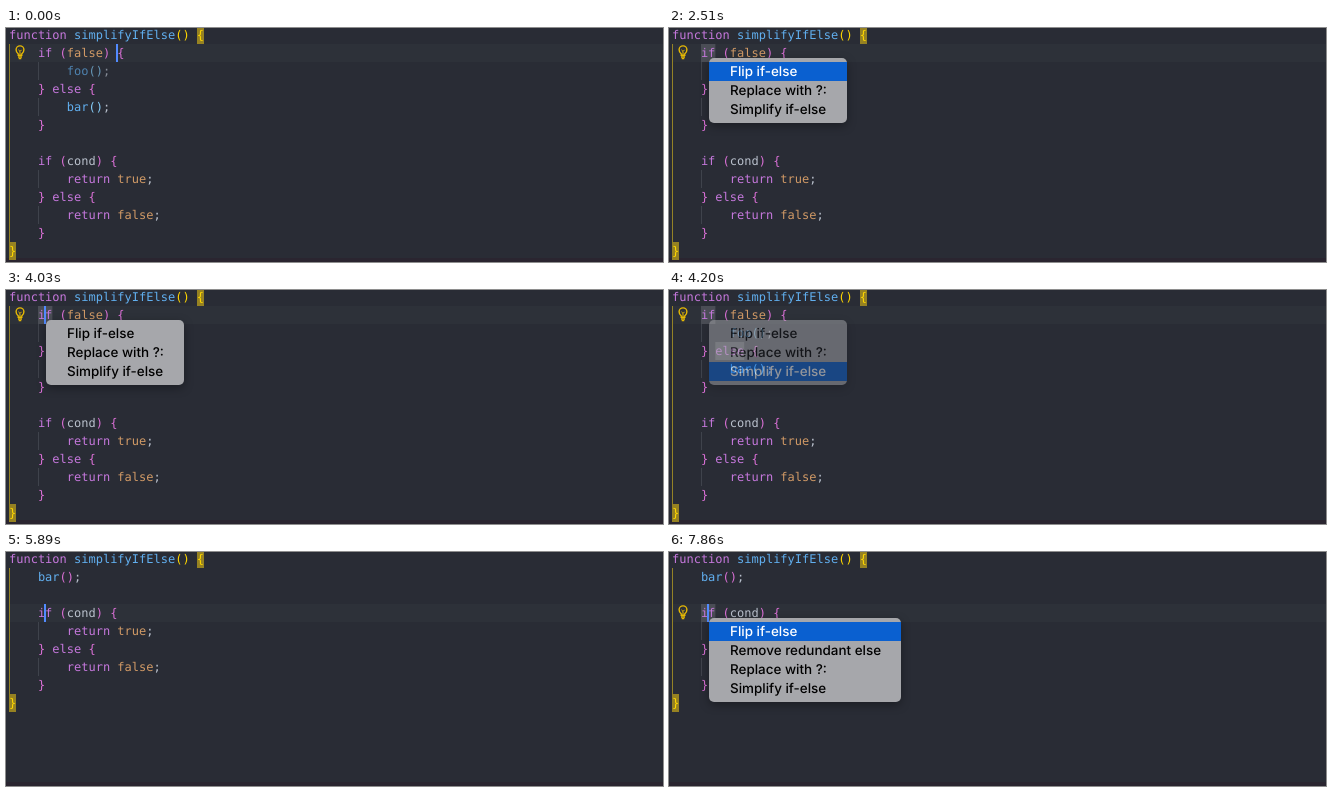
Write an HTML page that moves like this. It is 657 by 234 pixels and loops after 8 s.

```html
<!DOCTYPE html>
<html>
<head>
<meta charset="utf-8">
<style>
html, body { margin: 0; width: 100%; height: 100%; overflow: hidden; background: #292c35; }
svg { display: block; }
text { white-space: pre; text-rendering: geometricPrecision; }
.code { font: 12px "DejaVu Sans Mono", monospace; }
.menu { font: 500 13.45px Inter, "Liberation Sans", sans-serif; filter: drop-shadow(0 3px 5px #0005); }
</style>
</head>
<body>
<svg id="stage" width="657" height="234"></svg>
<script>
const LOOP = 8000, CHAR = 7.224, LINE = 18;
const colX = col => 3 + col * CHAR;
const rowY = row => row * LINE - 2;

const tail = `
    if (cond) {
        return true;
    } else {
        return false;
    }
}`;
const sources = [
`function simplifyIfElse() {
    if (false) {
        foo();
    } else {
        bar();
    }
` + tail,
`function simplifyIfElse() {
    bar();
` + tail];

const ifMenu = { width: 138, items: ['Flip if-else', 'Replace with ?:', 'Simplify if-else'] };
const returnMenu = { width: 192, items: ['Flip if-else', 'Remove redundant else', 'Replace with ?:', 'Simplify if-else'] };

// Each step changes part of the editor state from its time on.
const steps = [
  [0, { code: 0, row: 1, col: 15, caret: 2, bulb: 1, mark: 0, menu: null, sel: 0, alpha: 1 }],
  ...Array.from({ length: 7 }, (_, i) => [180 + Math.round(i * 980 / 6), { col: 14 - i }]),
  [1340, { col: 7 }],
  [1520, { col: 6 }],
  [1700, { col: 5 }],
  [1880, { mark: 1 }],
  [2150, { caret: 0 }],
  [2510, { menu: ifMenu }],
  [2690, { caret: 2 }],
  [3140, { caret: 0, sel: 1 }],
  [3400, { sel: 2 }],
  [3670, { caret: 2 }],
  [4030, { sel: -1 }],
  [4110, { sel: 2, caret: 0 }],
  [4200, { alpha: 0.5 }],
  [4280, { menu: null }],
  [4370, { code: 1, mark: 0, col: 10, caret: 1 }],
  [4460, { bulb: 0 }],
  [4640, { col: 5, caret: 2 }],
  [5090, { caret: 0 }],
  [5540, { caret: 2 }],
  [5710, { row: 2, col: 0 }],
  [5890, { row: 3, col: 5 }],
  [6070, { mark: 1 }],
  [6160, { bulb: 1 }],
  [6340, { caret: 0 }],
  [6790, { caret: 2 }],
  [7320, { menu: returnMenu, sel: -1, alpha: 1, caret: 0 }],
  [7410, { sel: 0 }],
  [7860, { caret: 2 }]
];

const rect = (x, y, w, h, fill, extra = '') =>
  `<rect x="${x}" y="${y}" width="${w}" height="${h}" fill="${fill}" ${extra}/>`;

const bracketColors = ['#ffd700', '#da70d6', '#87cefa'];

function tokenColor(word, isCall) {
  if (/^(function|if|else|return)$/.test(word)) return '#c678dd';
  if (/^(true|false)$/.test(word)) return '#d19a66';
  return isCall ? '#61afef' : '#b9c0cc';
}

function drawCode(source) {
  let depth = 0, out = '';
  const lines = source.split('\n');
  lines.forEach((line, row) => {
    const indent = line.search(/\S/);
    if (indent === 8) out += rect(32, rowY(row), 1, LINE, '#3f434c');
    let spans = '';
    for (const m of line.matchAll(/\w+|[^\w\s]/g)) {
      const word = m[0];
      let color;
      if (/[({]/.test(word)) color = bracketColors[depth++];
      else if (/[)}]/.test(word)) color = bracketColors[--depth];
      else color = tokenColor(word, line[m.index + word.length] === '(');
      spans += `<tspan x="${colX(m.index)}" fill="${color}">${word}</tspan>`;
    }
    const dim = line.includes('foo') ? 0.65 : 1;
    out += `<text class="code" y="${rowY(row) + 12.8}" opacity="${dim}">${spans}</text>`;
  });
  const last = lines.length - 1;
  const boxes = [[0, 26], [last, 0]].map(([row, col]) =>
    rect(Math.round(colX(col)), rowY(row), 7, LINE, '#968222')).join('');
  return rect(3, 16, 1, rowY(last) - 16, '#948226') + boxes + out;
}

function drawBulb(y) {
  return `<g transform="translate(14 ${y})" fill="none" stroke="#e6b905" stroke-width="1.4">
    <path d="M-1.8 4.2V2.8Q-3.9 1.4-3.9-1.2A3.9 3.9 0 0 1 3.9-1.2Q3.9 1.4 1.8 2.8V4.2Z"/>
    <path d="M-1.6-1.2L0 .4L1.6-1.2M0 .4V4" stroke-width="1"/>
    <path d="M-2 6H2M-1.3 7.6H1.3"/></g>`;
}

function drawMenu({ menu, sel, row, alpha }) {
  const top = rowY(row) + 14;
  const items = menu.items.map((label, i) => {
    const y = top + 4 + i * 19, on = i === sel;
    return (on ? rect(40, y, menu.width, 19, '#0a60d0') : '') +
      `<text x="61" y="${y + 14}" fill="${on ? '#fff' : '#000'}">${label}</text>`;
  }).join('');
  return `<g class="menu" opacity="${alpha}">` +
    rect(40, top, menu.width, menu.items.length * 19 + 8, '#a6a7ab', 'rx="5"') + items + '</g>';
}

function draw(s) {
  const y = rowY(s.row);
  let out = rect(3, y, 654, LINE, '#2d3139') + rect(0, 230, 657, 4, '#2a2530');
  if (s.mark) {
    out += rect(32, y, 14.4, LINE, '#4a4d55') + rect(46.3, y + 2 * LINE, 28.9, LINE, '#4a4d55');
  }
  out += drawCode(sources[s.code]);
  if (s.bulb) out += drawBulb(y + 7);
  if (s.caret === 2) out += rect(Math.round(colX(s.col) - 1), y, 2, LINE, '#528bff');
  if (s.caret === 1) out += rect(Math.round(colX(s.col)), y, 1, LINE, '#c8ccd4');
  if (s.menu) out += drawMenu(s);
  return out;
}

const stage = document.getElementById('stage');
let shown = -1;
function tick() {
  const t = performance.now() % LOOP;
  const count = steps.filter(([time]) => time <= t).length;
  if (count !== shown) {
    shown = count;
    stage.innerHTML = draw(Object.assign({}, ...steps.slice(0, count).map(step => step[1])));
  }
  requestAnimationFrame(tick);
}
tick();
</script>
</body>
</html>
```
